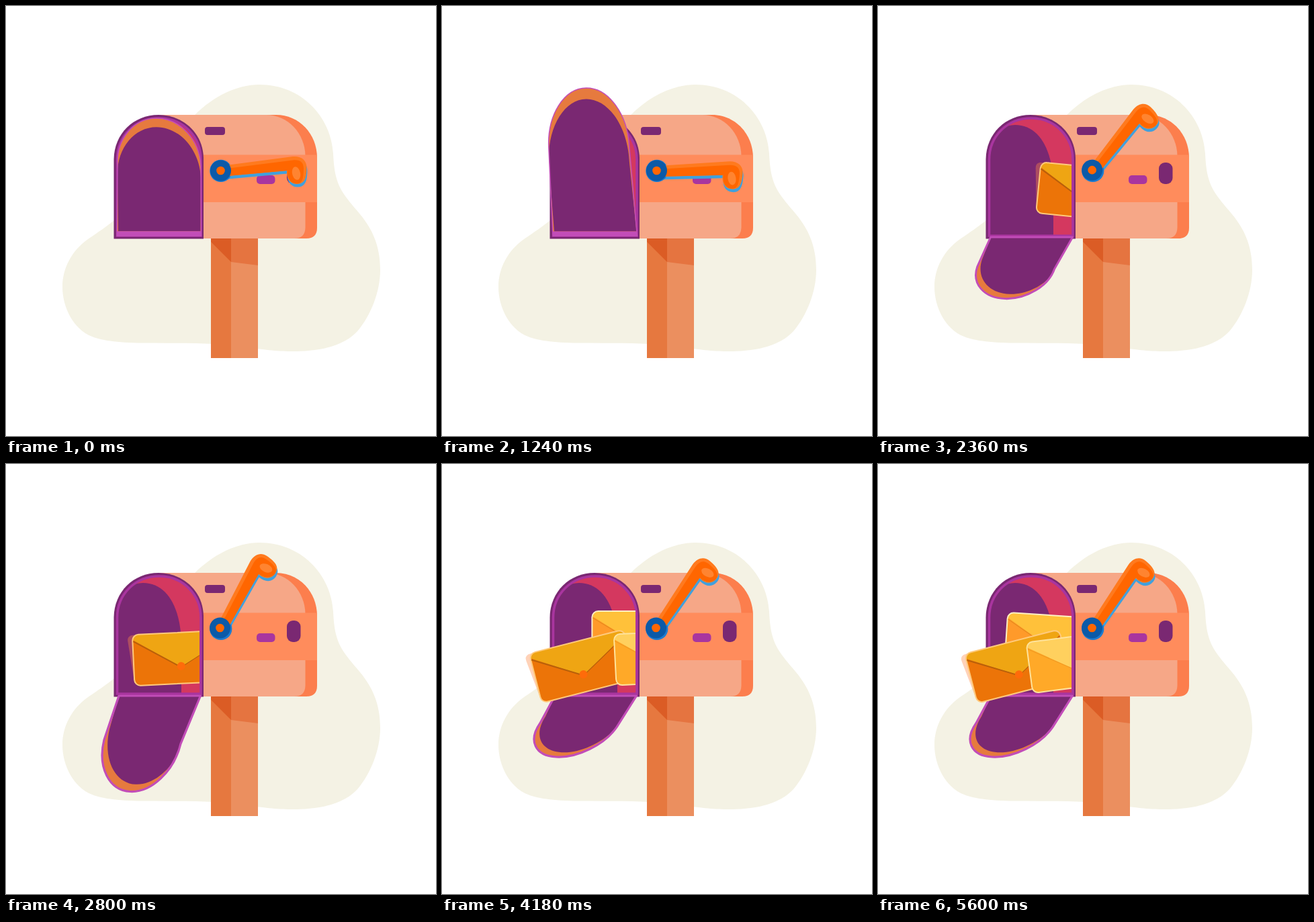
An HTML page for the animation above (8 s loop, 640 by 640 pixels).

```html
<!DOCTYPE html>
<html lang="en">
<head>
<meta charset="utf-8">
<title>Mailbox</title>
<style>
  html, body { margin: 0; width: 100%; height: 100%; overflow: hidden; background: #fff; }
  svg { display: block; width: 100vw; height: 100vh; }
  .flap { fill: var(--flap); }
  .rim { fill: none; stroke: var(--rim); stroke-width: 2; }
</style>
</head>
<body>
<svg viewBox="0 0 640 640">
  <defs>
    <path id="opening" d="M165.500 342V229C165.500 193 193 167 228 167C263 167 290 194 290 229V342Z"/>
    <clipPath id="mouth"><use href="#opening"/></clipPath>
    <clipPath id="left"><path d="M0 0H288V640H0Z"/></clipPath>
    <clipPath id="doorClip"><path id="doorClipPath"/></clipPath>
    <path id="flagShape" d="M328 237L427 224C440 223 447.500 230 447.500 240C447.500 255 445 265 433 265C423 265 417 257 418 245L330 253Z"/>
    <g id="letter">
      <rect width="145" height="76" rx="9"/>
      <path class="flap" d="M1 8Q2 0 9 0H136Q144 0 144 8L77 48Q71 53 65 48Z"/>
      <rect class="rim" width="145" height="76" rx="9"/>
    </g>
  </defs>

  <path fill="#f4f2e4" d="M377 117C440 117 484 165 487 220C489 262 496 274 522 304C545 330 557 356 557 393C557 425 543 460 524 483C500 510 458 514 425 514C400 514 385 511 355 508C320 501 270 502 220 501.500C175 502 145 499 128 492C100 481 84 448 84 418C84 390 98 364 122 347C150 328 185 305 205 270C230 225 250 195 280 163C310 133 345 117 377 117Z"/>

  <!-- post -->
  <path fill="#e6783f" d="M305 346H335.500V524H305Z"/>
  <path fill="#eb8f5f" d="M335 346H375V524H335Z"/>
  <path fill="#db5c25" d="M305 346H335V381L305 351Z"/>
  <path fill="#e57440" d="M335 346H375V386L335 381Z"/>

  <!-- box -->
  <path fill="#fc7e4d" d="M227 162H402C436 162 463 190 463 226V330Q463 346 447 346H228Z"/>
  <path fill="#f6a787" d="M227 162H387C419 162 445 189 445.500 223V330Q445 346 429 346H228Z"/>
  <path fill="#ff8c5c" d="M228 221.500H463V292H228Z"/>
  <rect x="296" y="180" width="30" height="12" rx="4" fill="#7a2872"/>
  <rect x="373" y="252" width="27.500" height="13" rx="5" fill="#a9359f"/>
  <rect x="418" y="233" width="20.500" height="32" rx="9" fill="#7a2872"/>
  <path fill="#7a2872" d="M160.500 346.500V228C161 190 190 162 227 162C260 162 293 186 294 226V346.500Z"/>
  <g clip-path="url(#mouth)">
    <path fill="#d4385f" d="M160 160H295V346H160Z"/>
    <path fill="#7a2872" d="M155 346V230C155 200 180 177 204 177C240 177 261 215 261 270V346Z"/>
  </g>
  <use href="#opening" fill="none" stroke="#a9359f" stroke-width="3.600"/>

  <!-- flag -->
  <use href="#flagShape" id="flagShade" fill="#41a0dc"/>
  <circle cx="319.800" cy="245.400" r="16.600" fill="#1c7cd0"/>
  <g id="flag">
    <use href="#flagShape" fill="#ff7a1e"/>
    <path fill="#ff6600" d="M328 242L427 229.500C438 228.500 443 233 443 242C443 254 442 264 433 264.500C424 264 418 256 419 245L330 253Z"/>
    <ellipse cx="432" cy="249" rx="6" ry="10" fill="#ff8430" transform="rotate(-12 432 249)"/>
  </g>
  <g id="hub">
    <circle cx="319.500" cy="245" r="15.500" fill="#0b5aa8"/>
    <circle cx="319.500" cy="245" r="6.300" fill="#ff6600"/>
  </g>

  <!-- door -->
  <path id="doorBack" fill="#e67a3e"/>
  <g clip-path="url(#doorClip)">
    <path id="doorFace" fill="#7a2872"/>
    <path id="lip" fill="#c24db8"/>
  </g>
  <path id="doorRim" fill="none" stroke="#c24db8" stroke-linejoin="round"/>

  <!-- letters -->
  <g clip-path="url(#left)">
    <g id="back" fill="#ff9a2a">
      <use href="#letter" style="--flap:#ffc13a;--rim:#fff0c4"/>
      <path fill="none" stroke="#e88a1c" stroke-width="1.200" d="M1 10L66 49"/>
    </g>
    <g id="middle" fill="#ec7408">
      <path fill="#ff8a45" opacity=".38" d="M10 0L-2 1Q-8 3 -7 10L0 71Q3 76 9 76Z"/>
      <use href="#letter" style="--flap:#efa513;--rim:#ffca7c"/>
      <path fill="none" stroke="#b8600a" stroke-width="2" d="M1 10L66 49"/>
      <path fill="none" stroke="#b8600a" stroke-width="1.200" d="M75 49L143 10"/>
      <circle cx="70.500" cy="50" r="6" fill="#ff6b0a"/>
    </g>
    <g id="front" fill="#ffa928">
      <use href="#letter" style="--flap:#ffd05e;--rim:#ffe39c"/>
      <path fill="none" stroke="#f29a22" stroke-width="1.200" d="M1 10L66 49"/>
    </g>
  </g>
</svg>
<script>
const LOOP = 8000, END = 5600, BEAT = 560;
const STEPS = [0, 120, 260, 300, 440];
const $ = id => document.getElementById(id);
const set = (id, name, value) => $(id).setAttribute(name, value);

// Cosine ease from 0 to 1 between two times.
function ease(t, from, to) {
  const u = Math.min(1, Math.max(0, (t - from) / (to - from)));
  return (1 - Math.cos(Math.PI * u)) / 2;
}

// Straight sides up from the hinge, closed by half a skewed ellipse.
function arch(hinge, mid, half, tip) {
  const k = 0.5523;
  const at = (a, b) => [0, 1].map(i =>
    (mid[i] + a * half[i] + b * (tip[i] - mid[i])).toFixed(2)).join(' ');
  return `M${hinge.x0} ${hinge.y}L${at(-1, 0)}C${at(-1, k)} ${at(-k, 1)} ${at(0, 1)}`
    + `C${at(k, 1)} ${at(1, k)} ${at(1, 0)}L${hinge.x1} ${hinge.y}Z`;
}

// The door swells towards the viewer, falls open, then springs back a little.
function drawDoor(t) {
  const rise = ease(t, 0, 1000);
  const fall = ease(t, 1020, 2720) ** 1.35;
  const back = ease(t, 2720, 4000);

  const y = 342.3 + 2.7 * fall ** 3;
  const lip = 7 * (1 - fall) ** 3;
  const height = y - (167 - 50 * rise + 371 * fall - 52 * back);
  const tipX = 224 - 9 * rise - 30 * fall - 15 * back;
  const midX = 228 - 9 * rise - 16 * fall;
  const half = [62 - 2 * rise - 3 * fall, 3 * fall - 50 * fall * (1 - fall) ** 2];
  const inset = 8 * fall;

  const rim = arch({ x0: 165 + 3 * fall, x1: 290.5 - fall, y },
    [midX, y - height * (0.6 - 0.12 * fall)], half, [tipX, y - height]);
  const face = arch({ x0: 167 + fall, x1: 289.5, y: y - lip },
    [midX + inset, y - height * (0.5 - 0.13 * fall)], half, [tipX + inset, y - height * 0.925]);

  for (const id of ['doorBack', 'doorRim', 'doorClipPath']) set(id, 'd', rim);
  set('doorFace', 'd', face);
  set('lip', 'd', `M160 ${y - lip}H295V${y}H160Z`);
  set('doorRim', 'stroke-width', 1.5 + 1.7 * fall);
}

// A small dip, a long swing up and a short settling.
function drawFlag(t) {
  const swing = ease(t, 1150, 2800);
  const angle = 4.3 * ease(t, 0, 1150) - 59.5 * swing + 5.5 * ease(t, 2800, 4000);
  const turn = `rotate(${angle} 319.5 245)`;
  set('flag', 'transform', turn);
  set('flagShade', 'transform', 'translate(1 4.5) ' + turn);
  set('hub', 'transform', `translate(${-swing} ${-swing})`);
}

// Letters glide from one pose (x, y, angle) to another along a slight bow.
function slide(id, t, start, from, to) {
  const q = Math.exp(-((Math.max(0, t - start) / 1060) ** 2));
  const bow = q * (1 - q);
  const [x, y, angle] = to.map((v, i) => v + (from[i] - v) * q);
  set(id, 'transform', `translate(${x} ${y - 18 * bow}) rotate(${angle + 10 * bow})`);
}

function held(ms) {
  if (ms >= END) return END;
  const rest = ms % BEAT;
  return ms - rest + STEPS.filter(s => s <= rest).pop();
}

function draw(ms) {
  const t = held(ms % LOOP);
  drawFlag(t);
  drawDoor(t);
  slide('back', t, 3009, [296, 227, -16], [193, 221, 3.8]);
  slide('middle', t, 1740, [289, 217, 11], [129, 282.5, -14.5]);
  slide('front', t, 3259, [296, 249, -3], [220, 266, -7.5]);
  // Before its turn the first letter waits out of sight.
  set('middle', 'opacity', t < 1400 ? 0 : 1);
}

let start;
function tick(now) {
  start ??= now;
  draw(now - start);
  requestAnimationFrame(tick);
}
draw(0);
requestAnimationFrame(tick);
</script>
</body>
</html>
```
